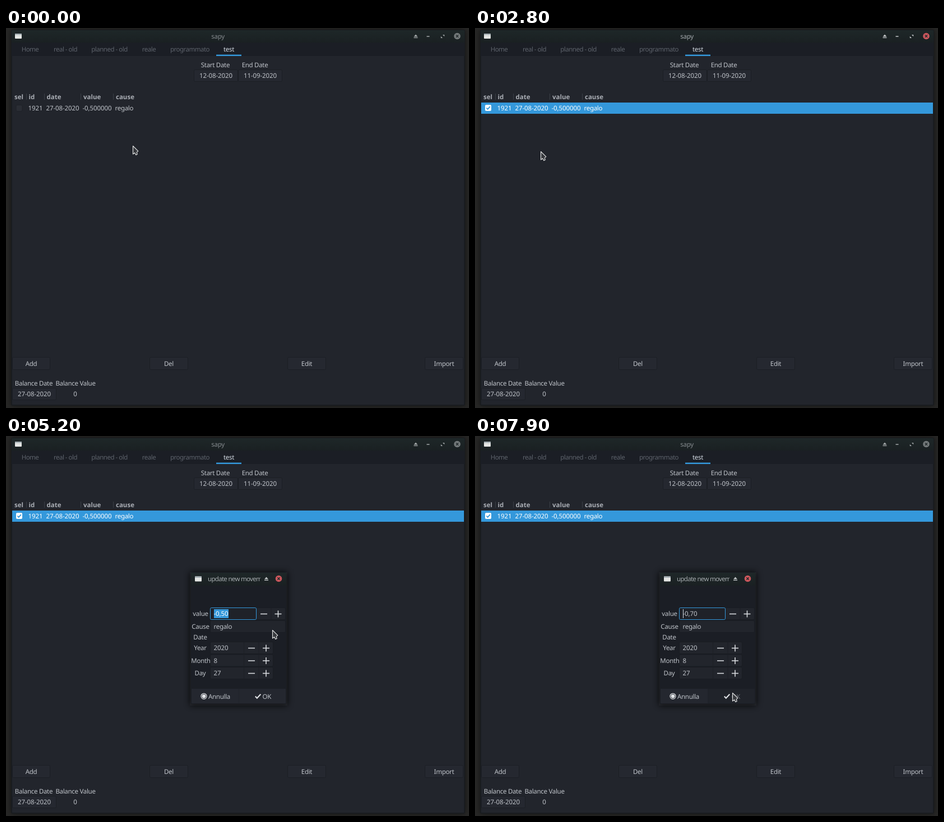
Animation, 826 px wide and 678 px high, one loop 8 s. Source, as an HTML page:

```html
<!DOCTYPE html>
<html lang="en">
<head>
<meta charset="utf-8">
<title>sapy</title>
<style>
  html, body { margin: 0; width: 100%; height: 100%; overflow: hidden; background: #272726; }
  svg { display: block; width: 826px; height: 678px; }
  text { font: 11.5px "Noto Sans", sans-serif; letter-spacing: -.3px; fill: #bfc3c9;
         text-rendering: geometricPrecision; white-space: pre; }
  .num { letter-spacing: -.1px; }
  .head { font-weight: 700; letter-spacing: 0; fill: #a9adb4; }
  .tab { letter-spacing: -.5px; fill: #5d626b; }
  .on { fill: #d3dae3; }
  .title { letter-spacing: -.7px; fill: #a3a9ac; }
</style>
</head>
<body>
<svg id="stage" viewBox="0 0 826 678"></svg>
<script>
const LOOP = 8000, STEP = 100, BLUE = '#3498db';
const stage = document.getElementById('stage');

// Drawing helpers: boxes by their edges, text by its vertical centre
const box = (x, y, x2, y2, fill, more = '') =>
  `<rect x="${x}" y="${y}" width="${x2 - x}" height="${y2 - y}" fill="${fill}" ${more}/>`;
const label = (s, x, y, cls = '', anchor = 'middle', more = '') =>
  `<text x="${x}" y="${y + 4.2}" class="${cls}" text-anchor="${anchor}" ${more}>${s}</text>`;
const left = (s, x, y, cls, more) => label(s, x, y, cls, 'start', more);
const line = (d, stroke, width, more = '') =>
  `<path d="${d}" fill="none" stroke="${stroke}" stroke-width="${width}" ${more}/>`;
const frame = (x, y, x2, y2, fill, stroke, more = '') =>
  box(x + .5, y + .5, x2 - .5, y2 - .5, fill, `stroke="${stroke}" rx="2" ${more}`);
const button = (s, x, y, x2, y2, cls = '', id = 'b') =>
  frame(x, y, x2, y2, '#252830', '#1b1e24', `id="${id}Box"`) +
  label(s, (x + x2) / 2, (y + y2) / 2, cls, 'middle', `id="${id}Text"`);
const minus = (x, y) => line(`M${x - 6} ${y + .5}h12`, '#d6d9dd', 1.6);
const plus = (x, y) => minus(x, y) + line(`M${x} ${y - 5.5}v12`, '#d6d9dd', 1.6);
const appIcon = (x, y) =>
  box(x, y, x + 12, y + 9, '#e4e6e4', 'rx="1"') + box(x, y, x + 12, y + 2.5, '#a9b3b8');
const eject = (x, y) =>
  `<path d="M${x - 3.5} ${y + .5}l3.5 -4 3.5 4zM${x - 3.5} ${y + 1.7}h7v1.4h-7z"/>`;
const closeMark = (x, y, id, fill) =>
  `<circle cx="${x}" cy="${y}" r="5.8" fill="${fill}" id="${id}"/>` +
  line(`M${x - 2.2} ${y - 2.2}l4.4 4.4m0 -4.4l-4.4 4.4`, '#20282a', 1.3);
const spin = (name, value, y, lx) =>
  label(name, lx, y) + frame(364, y - 11, 477, y + 11, '#22252c', '#191c22') +
  line(`M424.5 ${y - 10}v20M451 ${y - 10}v20`, '#1c1f25', 1) +
  left(value, 370.5, y, 'num') + minus(438, y) + plus(464, y);

const tabs = [['Home', 43], ['real - old', 106], ['planned - old', 184.5],
  ['reale', 255], ['programmato', 328]];
const heads = [['sel', 15], ['id', 40.5], ['date', 72.5], ['value', 138], ['cause', 196]];

const mainWindow = `
  ${box(10, 4, 818, 673, '#111', 'filter="url(#soft)" opacity=".6"')}
  ${box(9, 3, 819, 674, '#191c20', 'rx="3"')}
  ${box(10, 4, 818, 27, 'url(#bar)', 'rx="2"')}
  ${box(10, 26, 818, 50, '#1b1e25')}
  ${box(11, 50, 817, 672, '#22252c')}
  ${appIcon(16, 10)}
  ${label('sapy', 378, 14.5, '', 'middle', 'id="appTitle"')}
  <g id="winIcons">${eject(731, 15)}
    <path d="M750.5 14.3h5v1.5h-5zM779 12h3.2v3.2zM779 18h-3.2v-3.2z"/></g>
  ${closeMark(805, 14.5, 'appClose', '#747a7b')}
  ${tabs.map(([s, x]) => label(s, x, 37.5, 'tab')).join('')}
  ${label('test', 397.5, 37.5, 'on')}
  ${box(375, 47.5, 420, 50, BLUE)}
  ${label('Start Date', 373.5, 66)}${label('End Date', 444, 66)}
  ${button('12-08-2020', 335, 74, 414, 96, 'num')}
  ${button('11-09-2020', 414, 74, 493, 96, 'num')}
  ${heads.map(([s, x]) => left(s, x, 123, 'head')).join('')}
  ${line('M36.5 117v11M68.5 117v11M133.5 117v11M191.5 117v11', '#3b3f47', 1)}
  ${box(11, 133, 817, 153, 'none', 'id="row"')}
  <g id="check"></g>
  <g id="cells">${left('1921', 39.5, 143, 'num')}${left('27-08-2020', 71.5, 143, 'num')}
    ${left('-0,500000', 136.5, 143, 'num')}${left('regalo', 194.5, 143)}</g>
  ${button('Add', 11, 587, 79, 610)}${button('Del', 256, 587, 325, 610)}
  ${button('Edit', 502, 587, 571, 610, '', 'edit')}${button('Import', 747, 587, 816, 610)}
  ${label('Balance Date', 49.5, 634)}${label('Balance Value', 124, 634)}
  ${button('27-08-2020', 11, 642, 90, 664, 'num')}${label('0', 123.5, 653, 'num')}`;

const dialog = `<g id="dialog">
  ${box(328, 243, 502, 481, '#0c0d10', 'filter="url(#soft)" opacity=".8"')}
  ${box(330, 243, 500, 478, '#1b1e25', 'rx="2"')}
  ${box(330, 244, 500, 267, 'url(#bar)')}
  ${appIcon(337, 250.5)}
  <g clip-path="url(#clip)">${left('update new movement', 360, 254.5, 'title')}</g>
  <g fill="#c4c8c9">${eject(464.5, 255)}</g>
  ${closeMark(486.5, 254.5, 'dlgClose', '#cc575d')}
  ${label('value', 347, 317)}
  ${frame(364, 306, 499, 328, '#22252c', '#191c22')}
  ${box(447, 306, 473, 328, 'none', 'id="less"')}
  ${line('M473 307v20', '#1c1f25', 1)}
  ${frame(364, 306, 447, 328, '#1f2229', BLUE)}
  ${box(371, 309, 397, 325, BLUE, 'id="selection"')}
  ${left('', 370.5, 317, 'num', 'id="amount"')}
  ${line('M371.5 309v16', '#d3dae3', 1, 'id="caret"')}
  ${minus(460, 317)}${plus(485.5, 317)}
  ${label('Cause', 347, 340)}${frame(364, 329, 499, 351, '#22252c', '#191c22')}
  ${left('regalo', 370.5, 340)}
  ${label('Date', 346.5, 359)}
  ${spin('Year', '2020', 378, 346.5)}${spin('Month', '8', 400.5, 347.5)}${spin('Day', '27', 423, 346.5)}
  ${box(331, 451, 499, 477, '#24272f')}
  ${box(415, 451, 499, 477, '#20232a', 'id="okBox"')}
  ${line('M415.5 451v26', '#1f2229', 1)}
  <circle cx="353" cy="464.3" r="5" fill="none" stroke="#e2e4e7" stroke-width="1.2"/>
  <circle cx="353" cy="464.3" r="3.4" fill="#e2e4e7"/>
  ${left('Annulla', 361, 464.3)}
  ${line('M444.8 464.5l3 3.2 6.5 -7', '#e2e4e7', 2)}
  ${left('OK', 457.5, 464.3, '', 'id="okText"')}
</g>`;

stage.innerHTML = `<defs>
    <linearGradient id="bar" x2="0" y2="1"><stop stop-color="#1e2728"/><stop offset="1" stop-color="#1a2022"/></linearGradient>
    <filter id="soft" x="-25%" y="-25%" width="150%" height="150%"><feGaussianBlur stdDeviation="6"/></filter>
    <clipPath id="clip"><path d="M358 246h96v18h-96z"/></clipPath>
  </defs>
  ${box(0, 0, 826, 678, '#272726')}${mainWindow}${dialog}
  <path id="pointer" d="M.5 .5V15L3.6 12.7L5.8 16.6L8.2 15.2L7.2 11.8L9.8 9.6Z"
    fill="#393b3f" stroke="#e6e7e7" stroke-width="1.1" stroke-linejoin="round"/>`;

const ui = {};
stage.querySelectorAll('[id]').forEach(el => ui[el.id] = el);

// Pointer path: time, x, y
const path = [
  [0, 226, 210], [100, 225, 209], [300, 225, 209], [500, 184, 193], [800, 86, 148], [1200, 71, 142],
  [1600, 46, 142], [2000, 31, 141], [2600, 31, 141], [2900, 160, 260], [3200, 430, 540],
  [3500, 526, 629], [3600, 530, 604], [3700, 532, 601], [3900, 532, 601], [4200, 380, 360],
  [4400, 320, 270], [4700, 400, 322], [5000, 476, 370], [5300, 474, 334], [5500, 473, 324],
  [5600, 473, 324], [5800, 467, 312], [6000, 466, 309], [6600, 466, 309], [6800, 466, 310],
  [7100, 482, 400], [7400, 465, 489], [7500, 465, 489], [7700, 461, 468], [7900, 459, 458]
];

function pointerAt(t) {
  const i = path.findIndex(p => p[0] > t);
  if (i < 0) return path[path.length - 1].slice(1);
  const [t0, x0, y0] = path[i - 1], [t1, x1, y1] = path[i];
  const k = (t - t0) / (t1 - t0);
  return [x0 + (x1 - x0) * k, y0 + (y1 - y0) * k].map(Math.round);
}

const show = (el, on) => el.setAttribute('visibility', on ? 'visible' : 'hidden');
const fill = (el, color) => { el.style.fill = color; };

function draw(t) {
  const [x, y] = pointerAt(t);
  const over = (x1, y1, x2, y2) => x >= x1 && x < x2 && y >= y1 && y < y2;
  const active = t >= 2200 && t < 4100, picked = t >= 2300, open = t >= 4100;
  const hover = over(11, 133, 817, 153);

  ui.pointer.setAttribute('transform', `translate(${x} ${y})`);
  fill(ui.appTitle, active ? '#a3a9ac' : '#858b8e');
  fill(ui.winIcons, active ? '#c4c8c9' : '#a4a9aa');
  fill(ui.appClose, active ? '#cc575d' : '#747a7b');

  fill(ui.row, picked ? BLUE : hover ? '#33363f' : 'none');
  ui.cells.querySelectorAll('text').forEach(el => fill(el, picked ? '#fff' : ''));
  ui.check.innerHTML = picked
    ? box(18, 137, 29, 148, '#fff', 'rx="2"') + line('M20.4 142.5l2.3 2.4 4.2 -4.8', BLUE, 1.7)
    : frame(17.5, 137, 29.5, 149, hover ? '#2b2e36' : '#2a2d34', hover ? '#1c1f25' : '#1e2127');

  const onEdit = !open && over(502, 587, 571, 610);
  fill(ui.editBox, onEdit ? '#383b46' : '');
  fill(ui.editText, onEdit ? '#8b8f96' : '');

  show(ui.dialog, open);
  if (!open) {
    ['selection', 'caret', 'okBox'].forEach(id => show(ui[id], false));
    return;
  }
  const clicked = t >= 6000;
  const pressed = (t >= 6000 && t < 6200) || t === 6700;
  const onOk = over(415, 451, 499, 477);
  ui.amount.textContent = t >= 6700 ? '-0,70' : clicked ? '-0,60' : '-0,50';
  fill(ui.amount, clicked ? '' : '#fff');
  show(ui.selection, !clicked);
  show(ui.caret, clicked);
  fill(ui.less, pressed ? BLUE : over(447, 306, 473, 328) ? '#383b46' : 'none');
  show(ui.okBox, onOk);
  fill(ui.okText, onOk ? '#6b6e75' : '');
}

const start = performance.now();
function tick() {
  const t = (performance.now() - start) % LOOP;
  draw(Math.floor(t / STEP) * STEP);
  requestAnimationFrame(tick);
}
tick();
</script>
</body>
</html>
```
